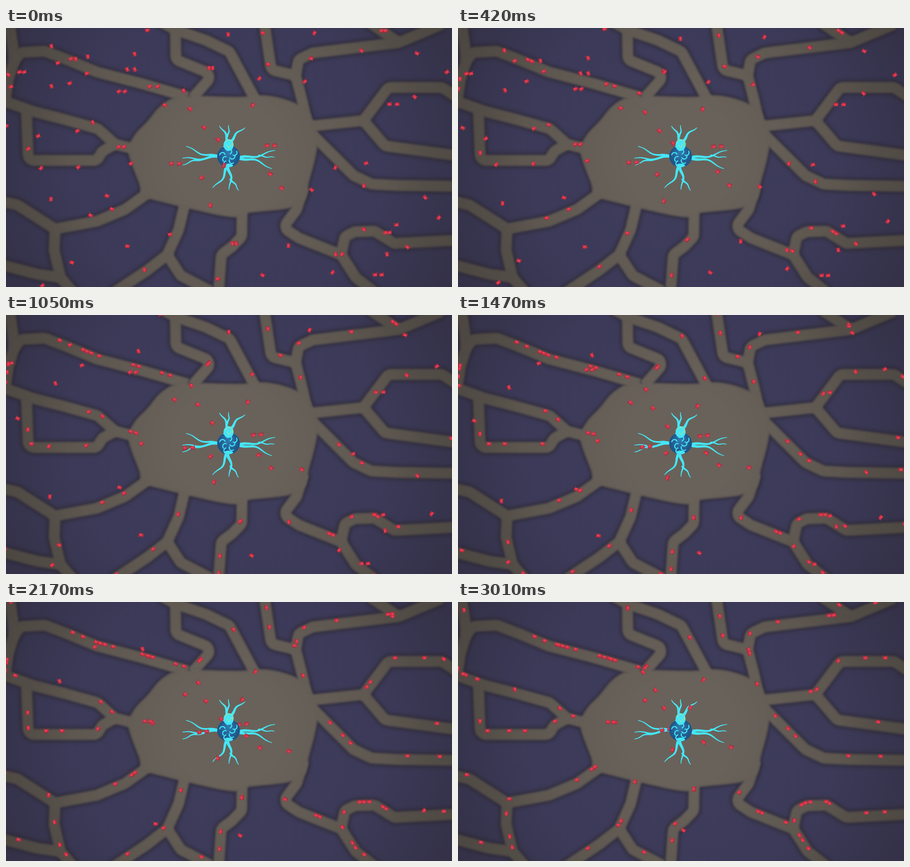
An HTML page with a canvas for the animation above (3.08 s loop, 982 px wide and 571 px high).

```html
<!DOCTYPE html>
<html lang="en">
<head>
<meta charset="utf-8">
<title>Hive paths</title>
<style>
html, body { margin: 0; width: 100%; height: 100%; overflow: hidden; background: #3b3957; }
canvas { display: block; width: 100vw; height: 100vh; }
</style>
</head>
<body>
<canvas id="stage" width="982" height="571"></canvas>
<script>
const W = 982, H = 571, LOOP = 3080, STEP = 70, TAU = Math.PI * 2;
const SPEED = 29;     // px per second
const TILT = 1.3;     // the tilted view makes vertical travel look slower
const LIFT = 8;       // critters stand above the ground
const QUEEN = [490, 283];
const CYAN = '#45e6f6';
const ctx = document.getElementById('stage').getContext('2d');

let seed = 7;
const random = () => (seed = seed * 16807 % 2147483647) / 2147483647;
const mix = (a, b, f) => [a[0] + (b[0] - a[0]) * f, a[1] + (b[1] - a[1]) * f];
const dist = (a, b) => Math.hypot(b[0] - a[0], (b[1] - a[1]) * TILT);
const same = (a, b) => a[0] === b[0] && a[1] === b[1];

function pairs(flat) {
  const out = [];
  for (let i = 0; i < flat.length; i += 2) out.push([flat[i], flat[i + 1]]);
  return out;
}

function layer(paint) {
  const c = document.createElement('canvas');
  c.width = W;
  c.height = H;
  paint(c.getContext('2d'));
  return c;
}

function radial(g, inner, outer, r0, r1) {
  const s = g.createRadialGradient(491, 285, r0, 491, 285, r1);
  s.addColorStop(0, inner);
  s.addColorStop(1, outer);
  return s;
}

// Roads run inwards; a branch ends on a corner of its trunk and follows it
const roads = [], routes = [];
function road(flat, trunk) {
  const pts = pairs(flat), end = pts[pts.length - 1];
  const onward = trunk ? trunk.slice(trunk.findIndex(p => same(p, end)) + 1) : [QUEEN];
  const route = pts.concat(onward);
  roads.push(pts);
  routes.push(route);
  return route;
}

const west = road([-30, 153, -2, 162, 60, 184, 130, 202, 202, 222, 240, 256, 295, 270]);
road([8, -10, 15, 40, 18, 72, 5, 115, -2, 162], west);
road([45, 184, 49, 292, 200, 292, 212, 272, 240, 256], west);
road([14, 78, 32, 54, 85, 51, 130, 68, 200, 97, 300, 123, 400, 152]);
const southWest = road([-20, 380, 25, 390, 108, 443, 200, 426, 262, 400, 325, 355]);
const creek = road([150, 585, 120, 550, 106, 490, 108, 443], southWest);
road([-10, 522, 70, 543, 120, 550], creek);
const south = road([235, 585, 310, 535, 355, 500, 380, 445, 393, 390]);
road([450, 580, 385, 546, 355, 500], south);
road([468, 585, 474, 500, 498, 482, 519, 460, 520, 395]);
const southEast = road([815, 585, 770, 550, 738, 500, 645, 463, 610, 440, 640, 400, 655, 350]);
road([990, 468, 855, 475, 812, 448, 768, 449, 746, 460, 738, 500], southEast);
road([990, 349, 860, 347, 805, 344, 765, 325, 670, 230]);
const east = road([992, 152, 960, 131, 842, 131, 787, 204, 665, 217]);
road([990, 281, 835, 260, 787, 204], east);
const northEast = road([960, -8, 865, 32, 675, 55, 644, 70, 638, 105, 652, 160, 661, 200]);
road([800, -12, 865, 32], northEast);
road([569, -10, 584, 92, 638, 105], northEast);
road([340, -14, 373, 4, 374, 70, 456, 103, 410, 155]);
road([373, 4, 440, 27, 492, 52, 550, 160]);

function closedCurve(flat) {
  const pts = pairs(flat), n = pts.length, path = new Path2D();
  const at = i => pts[(i + n) % n];
  path.moveTo(...pts[0]);
  for (let i = 0; i < n; i++) {
    const [a, b, c, d] = [at(i - 1), at(i), at(i + 1), at(i + 2)];
    path.bezierCurveTo(b[0] + (c[0] - a[0]) / 6, b[1] + (c[1] - a[1]) / 6,
      c[0] - (d[0] - b[0]) / 6, c[1] - (d[1] - b[1]) / 6, ...c);
  }
  return path;
}

const plaza = closedCurve([270, 275, 282, 238, 312, 205, 345, 168, 390, 151, 510, 152,
  575, 149, 635, 165, 670, 192, 686, 250, 668, 335, 645, 390, 530, 408, 490, 416,
  350, 385, 302, 369, 293, 342]);

function roadPath(pts) {
  const path = new Path2D();
  path.moveTo(...pts[0]);
  for (let i = 1; i < pts.length - 1; i++) path.arcTo(...pts[i], ...pts[i + 1], 14);
  path.lineTo(...pts[pts.length - 1]);
  return path;
}

function ways(style, width, rim, blur) {
  return layer(g => {
    g.filter = `blur(${blur}px)`;
    g.fillStyle = g.strokeStyle = style(g);
    g.lineJoin = 'round';
    g.lineWidth = width;
    for (const r of roads) g.stroke(roadPath(r));
    g.fill(plaza);
    g.lineWidth = rim;
    g.stroke(plaza);
  });
}

const ground = layer(g => {
  g.fillStyle = radial(g, '#3e3c5b', '#393754', 150, 560);
  g.fillRect(0, 0, W, H);
  g.globalAlpha = 0.75;
  g.drawImage(ways(() => '#302c3a', 35, 9, 3.5), 0, 0);
  g.globalAlpha = 1;
  g.drawImage(ways(c => radial(c, '#69625a', '#59534c', 120, 430), 24, 0.5, 2), 0, 0);
  g.fillStyle = radial(g, 'rgba(34,28,30,0)', 'rgba(34,28,30,.28)', 350, 600);
  g.fillRect(0, 0, W, H);
});

// Queen: a tendril is a tapering line with one bow and a slight ripple
function tendril(g, width, x0, y0, x1, y1, bow) {
  const N = 28, len = Math.hypot(x1 - x0, y1 - y0);
  const nx = (y0 - y1) / len, ny = (x1 - x0) / len;
  const point = u => {
    const off = bow * Math.sin(Math.PI * u) - Math.sign(bow) * len / 40 * Math.sin(TAU * 1.5 * u);
    const [x, y] = mix([x0, y0], [x1, y1], u);
    return [x + nx * off, y + ny * off];
  };
  g.strokeStyle = CYAN;
  g.lineCap = 'round';
  for (let i = 0; i < N; i++) {
    g.lineWidth = width + (1.2 - width) * i / N;
    g.beginPath();
    g.moveTo(...point(i / N));
    g.lineTo(...point((i + 1) / N));
    g.stroke();
  }
}

const arms = layer(g => {
  const arm = (...a) => tendril(g, ...a);
  arm(6, 488, 252, 470, 216, 4);
  arm(4, 487, 240, 490, 215, 2);
  arm(6, 496, 250, 526, 220, -4);
  arm(5, 468, 283, 397, 261, -5);
  arm(6, 468, 283, 389, 287, -3);
  arm(4, 434, 289, 389, 302, 2);
  arm(6, 512, 286, 592, 270, 4);
  arm(3, 556, 281, 591, 285, 1);
  arm(6, 512, 287, 585, 310, -6);
  arm(6, 486, 304, 455, 352, -7);
  arm(7, 487, 304, 491, 356, -6);
  arm(4, 494, 334, 512, 358, -2);
});

function oval(g, x, y, rx, ry, fill) {
  g.fillStyle = fill;
  g.beginPath();
  g.ellipse(x, y, rx, ry, 0, 0, TAU);
  g.fill();
}

const queen = layer(g => {
  const [x, y] = QUEEN;
  const skin = g.createRadialGradient(x, y - 8, 3, x, y, 26);
  skin.addColorStop(0, '#2e78ac');
  skin.addColorStop(1, '#1c4f82');
  oval(g, x, y, 25, 24, skin);
  g.strokeStyle = CYAN;
  g.lineWidth = 2.3;
  g.lineCap = 'round';
  for (let i = 0; i < 8; i++) {
    const a = i * 2.4, r = 8 + i * 1.4;
    g.beginPath();
    g.arc(x + r * Math.cos(a), y + r * Math.sin(a), 6, a, a + 2.6);
    g.stroke();
  }
  oval(g, x, y + 20, 10, 4, CYAN);
  oval(g, x, 258, 11, 13, CYAN);
});

function crown(t) {
  const beat = Math.sin(t / 250);
  ctx.strokeStyle = '#b9dc86';
  ctx.lineWidth = 1.2;
  ctx.beginPath();
  ctx.arc(491, 256, 9 + beat, 3.4, 6.8);
  ctx.moveTo(486, 257 + beat);
  ctx.lineTo(491, 264);
  ctx.lineTo(497, 255 - beat);
  ctx.stroke();
}

// Swarm: cut across to the nearest road, then follow it to the queen
function walk(pts, d) {
  for (let i = 1; ; i++) {
    const a = pts[i - 1], b = pts[i], len = dist(a, b);
    if (d <= len || i === pts.length - 1) {
      return { at: mix(a, b, Math.min(1, d / (len || 1))), next: i,
        turn: Math.atan2(b[1] - a[1], b[0] - a[0]) };
    }
    d -= len;
  }
}

function nearest(p) {
  let best = { gap: Infinity }, run;
  for (const route of routes) {
    run = 0;
    for (let i = 1; i < route.length; i++) {
      const a = route[i - 1], b = route[i], len = dist(a, b);
      const dot = (p[0] - a[0]) * (b[0] - a[0]) + (p[1] - a[1]) * (b[1] - a[1]) * TILT * TILT;
      const f = Math.max(0, Math.min(1, dot / (len * len)));
      const gap = dist(p, mix(a, b, f));
      if (gap < best.gap) best = { gap, route, along: run + f * len };
      run += len;
    }
  }
  return best;
}

const swarm = [];
const enlist = track => swarm.push({ track, phase: random() * TAU });

function critter(x, y) {
  const p = [x, y + LIFT];
  if (ctx.isPointInPath(plaza, ...p)) return enlist([p, QUEEN]);
  const { gap, route, along } = nearest(p);
  const join = walk(route, along + gap * 0.7);
  enlist([p, join.at, ...route.slice(join.next)]);
}

pairs([100, 40, 114, 77, 180, 63, 178, 100, 140, 122, 100, 128, 283, 57, 391, 138, 349, 170,
  5, 103, 11, 129, 0, 215, 191, 208, 157, 227, 71, 238, 49, 266, 77, 309, 159, 307, 275, 299,
  99, 377, 222, 370, 186, 413, 233, 399, 145, 517, 267, 481, 80, 568, 305, 533, 361, 455,
  450, 391, 431, 330, 466, 553, 565, 545, 622, 480, 405, 178, 436, 219, 467, 246, 543, 170,
  582, 322, 607, 353, 673, 357, 480, 303, 311, 5, 489, 14, 558, 111, 577, 80, 565, 11,
  679, 11, 658, 118, 672, 67, 783, 50, 905, 56, 971, 97, 900, 152, 793, 298, 725, 308,
  788, 348, 923, 374, 953, 418, 860, 434, 788, 444, 884, 483, 839, 499, 719, 539,
]).forEach(p => critter(...p));

// couples side by side
pairs([148, 68, 275, 91, 255, 140, 325, 129, 35, 97, 254, 262, 853, 168, 831, 6,
  840, 451, 820, 544, 733, 499, 583, 259, 373, 299, 451, 88, 503, 475,
]).forEach(([x, y]) => {
  const gap = 4 + random() * 5;
  critter(x - gap, y);
  critter(x + gap, y);
});

// newcomers wait outside where a road enters the stage
for (const route of routes) {
  const [[x, y], b] = route;
  if (x > 0 && x < W && y > 0 && y < H) continue;
  const back = -(20 + random() * 30) / dist([x, y], b);
  enlist([mix([x, y], b, back), ...route]);
}

function drawCritter({ at, turn, swing }) {
  ctx.save();
  ctx.translate(at[0], at[1] - LIFT);
  ctx.rotate(turn);
  ctx.strokeStyle = '#b02b40';
  ctx.lineWidth = 1.5;
  ctx.lineCap = 'round';
  ctx.beginPath();
  for (const side of [-1, 1]) {
    for (const end of [-1, 1]) {
      ctx.moveTo(end * 2, side * 2);
      ctx.lineTo(end * (4.5 + swing * side), side * 4.3);
    }
  }
  ctx.stroke();
  oval(ctx, -0.2, 0.6, 4.9, 3.6, '#a32a40');
  oval(ctx, 0.2, -0.3, 4.5, 3.1, '#d83547');
  oval(ctx, 4.4, 0, 1.7, 1.6, '#c93046');
  oval(ctx, -0.8, -0.8, 1.9, 1.1, '#e84c5a');
  ctx.restore();
}

function pointer(x, y) {
  ctx.beginPath();
  pairs([0, 0, 0, 14, 3, 11, 5.5, 16, 7.8, 15, 5.4, 10, 9.5, 10])
    .forEach(([px, py]) => ctx.lineTo(x + px, y + py));
  ctx.closePath();
  ctx.fillStyle = '#15151c';
  ctx.fill();
  ctx.strokeStyle = '#dedee4';
  ctx.lineWidth = 1.1;
  ctx.stroke();
}

function draw(t) {
  ctx.drawImage(ground, 0, 0);
  ctx.drawImage(arms, 0, 0);
  const posed = swarm.map(({ track, phase }) =>
    ({ ...walk(track, SPEED * t / 1000), swing: Math.sin(t / 70 + phase) }));
  const front = c => c.at[1] - LIFT > 296;
  posed.filter(c => !front(c)).forEach(drawCritter);
  ctx.drawImage(queen, 0, 0);
  crown(t);
  posed.filter(front).forEach(drawCritter);
  if (t >= 1750 && t < 1960) pointer(923, 384);
}

const start = performance.now();
function tick() {
  const t = (performance.now() - start) % LOOP;
  draw(Math.floor(t / STEP) * STEP);
  requestAnimationFrame(tick);
}
tick();
</script>
</body>
</html>
```
